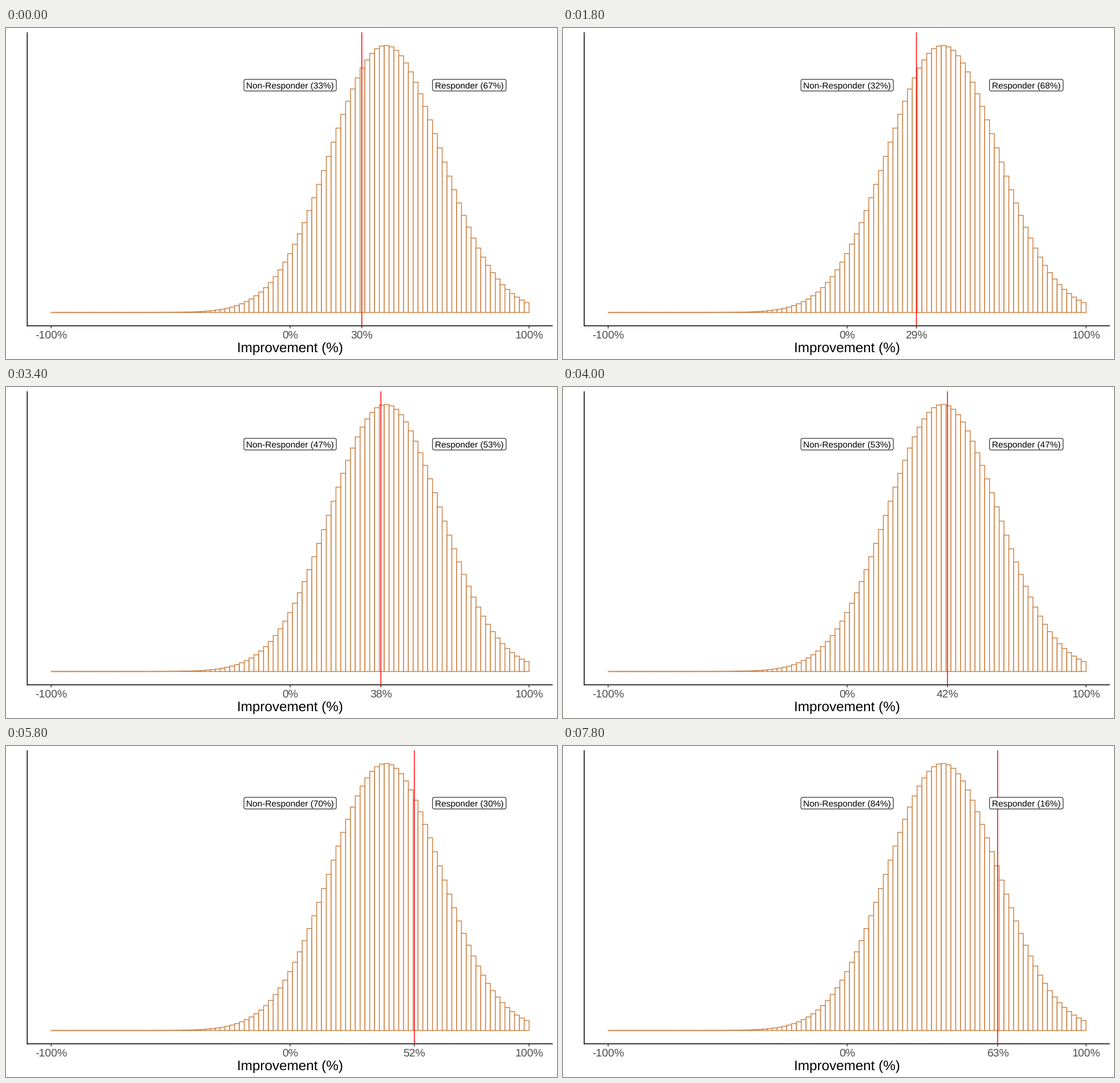
These frames come from a looping animation (966 px wide and 580 px high, 8000 ms). A matplotlib script:

```python
import math

import numpy as np
import matplotlib.pyplot as plt
from matplotlib.animation import FuncAnimation
from matplotlib.patches import FancyBboxPatch

W, H, DPI = 966, 580, 100
FRAMES, STEP = 40, 200
PX = 72 / DPI  # points per pixel

plt.rcParams.update({
    "font.family": "Liberation Sans",
    "text.hinting": "none",
    "path.snap": False,
})

LEFT, RIGHT = 79.2, 917.0
BASE, TOP, FLOOR = 498.5, 7.5, 521.8
BINS, PEAK = 99, 468
MEAN, SD = 40, 23  # improvement in percent


def to_x(pct):
    return LEFT + (pct + 100) / 200 * (RIGHT - LEFT)


def below(pct):
    """Percentage of the normal distribution under a threshold."""
    return round(50 * (1 + math.erf((pct - MEAN) / SD / math.sqrt(2))))


def cutoff(i):
    """Threshold in percent: opens on 30, then sweeps up from 20."""
    return 30 if i == 0 else round(20 + (i - 1) * 50 / 44)


fig = plt.figure(figsize=(W / DPI, H / DPI), dpi=DPI, facecolor="white")
ax = fig.add_axes([0, 0, 1, 1])
ax.set_xlim(0, W)
ax.set_ylim(H, 0)
ax.axis("off")


def line(xs, ys, color, z):
    return ax.plot(xs, ys, color=color, lw=1.5 * PX, zorder=z,
                   solid_capstyle="butt")[0]


def text(x, y, s, size, color="black"):
    return ax.text(x, y, s, fontsize=size * PX, color=color, ha="center",
                   va="baseline", zorder=6)


def tick(pct):
    x = to_x(pct)
    mark = line([x, x], [FLOOR, FLOOR + 4.5], "#333333", 3)
    return mark, text(x, 543.8, f"{pct}%", 19.4, "#4D4D4D")


def label(pct, width):
    ax.add_patch(FancyBboxPatch(
        (to_x(pct) - width / 2, 90), width, 20.3, fc="white", ec="black",
        lw=PX, zorder=5, boxstyle="round,pad=0,rounding_size=3.3"))
    return text(to_x(pct), 105.6, "", 15.4)


edges = np.linspace(-100, 100, BINS + 1)
centers = (edges[:-1] + edges[1:]) / 2
heights = PEAK * np.exp(-((centers - MEAN) / SD) ** 2 / 2)
ax.bar(to_x(centers), -heights, width=(RIGHT - LEFT) / BINS, bottom=BASE,
       fc="white", ec="#CC8041", lw=1.45 * PX, zorder=1)

line([37.2, 37.2], [TOP, FLOOR + 0.7], "black", 3)
line([36.5, 958.5], [FLOOR, FLOOR], "black", 3)
for p in (-100, 0, 100):
    tick(p)
text(498, 568, "Improvement (%)", 24.25)

non_text = label(0, 162)
resp_text = label(75, 129)
cut_line = line([0, 0], [TOP, FLOOR], "red", 4)
cut_mark, cut_text = tick(30)


def update(i):
    pct = cutoff(i)
    x = to_x(pct)
    non = below(pct)
    for item in (cut_line, cut_mark):
        item.set_xdata([x, x])
    cut_text.set_x(x)
    cut_text.set_text(f"{pct}%")
    non_text.set_text(f"Non-Responder ({non}%)")
    resp_text.set_text(f"Responder ({100 - non}%)")
    return cut_line, cut_mark, cut_text, non_text, resp_text


anim = FuncAnimation(fig, update, frames=FRAMES, interval=STEP,
                     init_func=lambda: update(0), repeat=True,
                     repeat_delay=0, blit=False)
plt.show()
```
